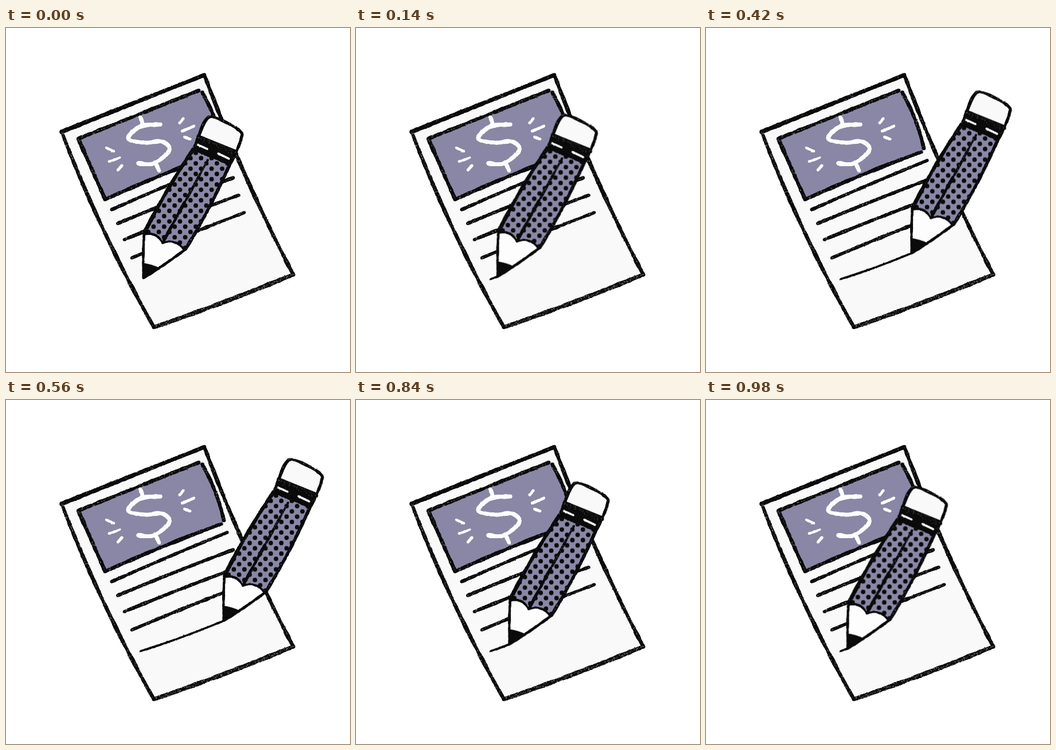
Animation of 600 by 600 pixels, one loop 1.12 s. Source, as an HTML page with a canvas:

```html
<!DOCTYPE html>
<html lang="en">
<head>
<meta charset="utf-8">
<title>Pencil and paper</title>
<style>
html, body { margin: 0; width: 100%; height: 100%; overflow: hidden; background: #fff; }
canvas { display: block; width: 100vw; height: 100vh; }
</style>
</head>
<body>
<canvas id="stage" width="600" height="600"></canvas>
<script>
const SIZE = 600, STEP = 140;
const INK = '#0b0b0c', PAPER = '#f9f9fa', TINT = '#8987a5', WHITE = '#fdfdfd';
const stage = document.getElementById('stage').getContext('2d');

let seed = 1;
function rand() {
  seed = (seed * 16807) % 2147483647;
  return seed / 2147483647;
}
const spread = a => (rand() - 0.5) * 2 * a;

function layer() {
  const c = document.createElement('canvas');
  c.width = c.height = SIZE;
  return c.getContext('2d');
}

// Slightly softened copy of a finished layer
function soften(g, px) {
  const out = layer();
  out.filter = `blur(${px}px)`;
  out.drawImage(g.canvas, 0, 0);
  return out.canvas;
}

// Points of a line from a to b that bulges by `bend` to its left-hand side
function bow(ax, ay, bx, by, bend = 0) {
  const dx = bx - ax, dy = by - ay, len = Math.hypot(dx, dy);
  const n = Math.ceil(len / 0.8), pts = [];
  for (let i = 0; i <= n; i++) {
    const t = i / n, k = 4 * t * (1 - t) * bend / len;
    pts.push([ax + dx * t + dy * k, ay + dy * t - dx * k]);
  }
  return pts;
}

// Points of a smooth curve through a few key points
function curve(...p) {
  const pts = [];
  for (let i = 0; i < p.length - 1; i++) {
    const b = p[i], c = p[i + 1], a = p[i - 1] || b, d = p[i + 2] || c;
    const n = Math.ceil(Math.hypot(c[0] - b[0], c[1] - b[1]) / 0.8);
    for (let k = 0; k < n; k++) {
      const t = k / n;
      pts.push([0, 1].map(j => b[j] + 0.5 * t * (c[j] - a[j] +
        t * (2 * a[j] - 5 * b[j] + 4 * c[j] - d[j] +
        t * (3 * (b[j] - c[j]) + d[j] - a[j])))));
    }
  }
  return pts;
}

function dot(g, x, y, r) {
  g.beginPath();
  g.arc(x, y, r, 0, Math.PI * 2);
  g.fill();
}

// Charcoal-like line; grain lets specks of another colour show through
function rough(g, pts, width, color = INK, grain = 0, speck = PAPER) {
  const r = width / 2;
  let swell = 0;
  g.fillStyle = color;
  for (const [x, y] of pts) {
    swell = swell * 0.9 + spread(0.07);
    dot(g, x + spread(0.3), y + spread(0.3), r * (0.97 + swell));
    if (rand() < 0.4) dot(g, x + spread(r), y + spread(r), 0.4 + rand() * 0.6);
  }
  g.fillStyle = speck;
  for (const [x, y] of pts) {
    if (rand() > grain) continue;
    g.globalAlpha = 0.15 + rand() * 0.4;
    dot(g, x + spread(r), y + spread(r), 0.4 + rand() * 0.6);
  }
  g.globalAlpha = 1;
}

function fill(g, sides, color) {
  g.beginPath();
  sides.flat().forEach(([x, y]) => g.lineTo(x, y));
  g.closePath();
  g.fillStyle = color;
  g.fill();
}

function drawDollar(g) {
  rough(g, bow(234, 155, 240, 170), 6, WHITE);
  rough(g, curve([269, 168], [234, 172], [213, 193], [243, 200],
    [272, 198], [285, 213], [258, 236], [230, 236]), 7, WHITE);
  rough(g, bow(260, 234, 267, 249), 6, WHITE);
  const ray = (...ends) => rough(g, bow(...ends), 4.6, WHITE);
  ray(175, 209, 188, 215);
  ray(180, 233, 199, 226);
  ray(195, 248, 202, 240);
  ray(303, 166, 309, 158);
  ray(307, 180, 328, 171);
  ray(311, 190, 321, 194);
}

function drawPaper() {
  const g = layer();
  const top = bow(97, 181, 346, 82);
  const right = bow(346, 82, 501, 430, -6);
  const bottom = bow(501, 430, 258, 522, 2);
  const left = bow(258, 522, 97, 181, 7);
  fill(g, [top, right, bottom, left], PAPER);

  const frame = [bow(126, 193, 336, 109), bow(342, 112, 380, 210, 4),
    bow(376, 216, 173, 299, -2), bow(173, 299, 126, 193)];
  fill(g, frame, TINT);
  frame.forEach(side => rough(g, side, 6, INK, 0.3));
  drawDollar(g);

  rough(g, top, 7, INK, 0.15);
  rough(g, right, 6.2, INK, 0.35);
  rough(g, bottom, 6.8, INK, 1.5);
  rough(g, left, 6.2, INK, 0.45);

  for (let i = 0; i < 4; i++) {
    const x = 184 + 10 * i + 0.6 * i * i, y = 317 + 22 * i + 2 * i * i;
    rough(g, bow(x, y, 386 + 10 * i, 231 + 30.3 * i, 1), 5.4, INK, 0.35);
  }
  return soften(g, 0.5);
}

function drawPencil() {
  const g = layer();
  const bodyL = bow(241, 358, 327, 211, 3);
  const bodyR = bow(390, 238, 313, 386, 3);
  const body = [bodyL, bodyR];

  // Body with halftone dots on a diagonal grid
  fill(g, body, TINT);
  g.save();
  g.clip();
  g.fillStyle = INK;
  const gap = 9.2;
  for (let row = -11; row < 9; row++) {
    for (let col = -1; col < 20; col++) {
      if ((row + col) % 2 === 0) dot(g, 239 + col * gap, 309.7 + row * gap, 3.9);
    }
  }
  g.restore();
  rough(g, bow(352, 230, 314, 300), 4, INK, 0.5, TINT);
  rough(g, bow(312, 303, 275, 371), 5, INK, 0.15, TINT);

  // Sharpened end
  const scallop = [bow(241, 360, 273, 375, 7), bow(273, 375, 310, 386, 7)];
  const coneL = bow(240, 436, 241, 358, 1);
  const coneR = bow(313, 386, 240, 436, 1);
  fill(g, [...scallop, coneR, coneL], WHITE);
  fill(g, [bow(240, 410, 267, 418, 1), bow(267, 418, 240, 437)], INK);
  scallop.forEach(s => rough(g, s, 3.6));
  rough(g, coneL, 4.2);
  rough(g, coneR, 4.4);
  rough(g, bodyL, 6, INK, 0.2, TINT);
  rough(g, bodyR, 5.5, INK, 0.25, TINT);

  // Eraser and metal band
  const eraser = curve([329, 208], [347, 163], [364, 156], [406, 178], [410, 194], [392, 236]);
  fill(g, [eraser], PAPER);
  fill(g, [bow(338, 187, 405, 214), bow(392, 236, 327, 210)], INK);
  rough(g, bow(339, 192, 401, 218), 8, INK, 1, '#777');
  rough(g, bow(333, 203, 351, 211), 3.6, WHITE);
  rough(g, bow(370, 219, 389, 228), 3.6, WHITE);
  rough(g, bow(328, 211, 391, 237), 5.5);
  rough(g, eraser, 5, INK, 0.15);
  return soften(g, 0.6);
}

const paper = drawPaper(), pencil = drawPencil();

// How far the pencil has gone on each beat; the way back mirrors it
const reach = [0, 7.5, 28, 119, 140], RISE = -0.365;

function draw(now) {
  const beat = Math.floor(now / STEP) % 8;
  const dx = reach[Math.min(beat, 8 - beat)], dy = dx * RISE;
  stage.fillStyle = '#fff';
  stage.fillRect(0, 0, SIZE, SIZE);
  stage.drawImage(paper, 0, 0);
  if (dx) {
    seed = 77;
    rough(stage, bow(235, 438, 240 + dx, 436 + dy, -dx / 80), 3.6);
  }
  stage.drawImage(pencil, dx, dy);
}

const start = performance.now();
function tick() {
  draw(performance.now() - start);
  requestAnimationFrame(tick);
}
tick();
</script>
</body>
</html>
```
